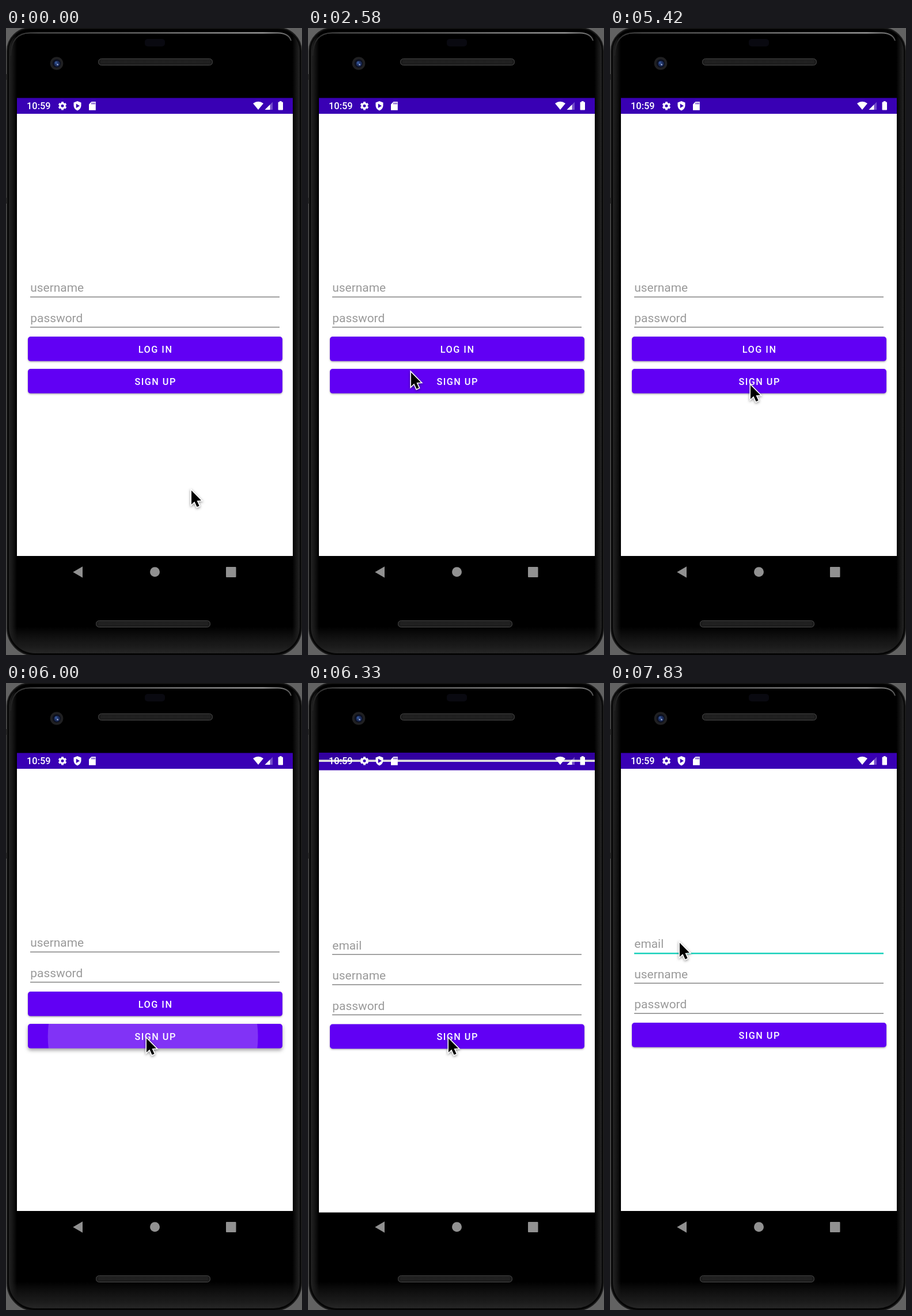
An HTML page with a canvas that plays this animation: 514x1089 px, repeating every 8000 ms.

```html
<!DOCTYPE html>
<html lang="en">
<head>
<meta charset="utf-8">
<title>Sign up flow</title>
<style>
html, body { margin: 0; width: 100%; height: 100%; overflow: hidden; background: #000; }
canvas { display: block; width: 514px; height: 1089px; }
</style>
</head>
<body>
<canvas id="stage"></canvas>
<script>
const W = 514, H = 1089, LOOP = 8000, FPS = 12;
const VIEW = { x: 19, y: 121, w: 479, h: 851 };
const canvas = document.getElementById('stage');
const ctx = canvas.getContext('2d');
const ratio = window.devicePixelRatio || 1;
canvas.width = W * ratio;
canvas.height = H * ratio;

// Pointer tip: time, x, y
const PATH = [
  [0, 321, 801], [670, 203, 586], [1000, 196, 563], [1330, 191, 542],
  [1580, 184, 550], [2330, 182, 594], [2580, 178, 596], [2720, 160, 604],
  [2830, 150, 599], [3000, 156, 592], [3170, 162, 584], [3960, 162, 584],
  [4170, 172, 580], [4420, 172, 580], [5250, 243, 618], [5420, 243, 618],
  [5900, 243, 615], [6750, 243, 615], [7330, 120, 449], [8000, 120, 449]
];
const PRESS = 5830, OPEN = 6048, OPEN_TIME = 425, FOCUS = 7330, BLINK = 500;

const clamp = v => Math.max(0, Math.min(1, v));
const cubic = (a, b, c, d, s) => {
  const r = 1 - s;
  return a * r * r * r + 3 * b * r * r * s + 3 * c * r * s * s + d * s * s * s;
};

// Solves a Bezier easing from (x0,y0) to (x3,y3) for x
function bezier(x0, y0, x1, y1, x2, y2, x3, y3, x) {
  let lo = 0, hi = 1;
  for (let i = 0; i < 24; i++) {
    const mid = (lo + hi) / 2;
    if (cubic(x0, x1, x2, x3, mid) < x) lo = mid; else hi = mid;
  }
  return cubic(y0, y1, y2, y3, lo);
}
const slideEase = x => bezier(0, 0, .4, 0, .2, 1, 1, 1, x);
const revealEase = x => x < 1 / 6
  ? bezier(0, 0, .05, 0, .1333, .06, 1 / 6, .4, x)
  : bezier(1 / 6, .4, .2083, .82, .25, 1, 1, 1, x);

function rect(x, y, w, h, fill) {
  ctx.fillStyle = fill;
  ctx.fillRect(x, y, w, h);
}

function pill(x, y, w, h, r, fill, stroke, width = 1) {
  ctx.beginPath();
  ctx.roundRect(x, y, w, h, r);
  if (fill) { ctx.fillStyle = fill; ctx.fill(); }
  if (stroke) { ctx.strokeStyle = stroke; ctx.lineWidth = width; ctx.stroke(); }
}

function disc(x, y, r, fill) {
  ctx.beginPath();
  ctx.arc(x, y, r, 0, Math.PI * 2);
  ctx.fillStyle = fill;
  ctx.fill();
}

function poly(points, fill) {
  ctx.beginPath();
  points.forEach(([x, y]) => ctx.lineTo(x, y));
  ctx.closePath();
  ctx.fillStyle = fill;
  ctx.fill();
}

function text(str, x, y, font, fill, align = 'left', spacing = 0) {
  ctx.font = font + ' Roboto, sans-serif';
  ctx.letterSpacing = spacing + 'px';
  ctx.textAlign = align;
  ctx.fillStyle = fill;
  ctx.fillText(str, x, y);
  ctx.letterSpacing = '0px';
}

function fade(x0, y0, x1, y1, ...stops) {
  const g = ctx.createLinearGradient(x0, y0, x1, y1);
  stops.forEach(([at, color]) => g.addColorStop(at, color));
  return g;
}

function speaker(x, y) {
  pill(x + .5, y + .5, 198, 11, 5, '#1b1b1b', '#4a4a4a');
  ctx.strokeStyle = '#303030';
  ctx.lineWidth = 1;
  ctx.setLineDash([1, 1]);
  ctx.beginPath();
  for (const dy of [3.5, 5.5, 7.5]) {
    ctx.moveTo(x + 5, y + dy);
    ctx.lineTo(x + 194, y + dy);
  }
  ctx.stroke();
  ctx.setLineDash([]);
}

function device() {
  rect(0, 0, W, H, '#626262');
  rect(0, 80, 5, 10, '#2b2b2b');
  rect(0, 295, 5, 10, '#2b2b2b');
  rect(0, 90, 3, 205, '#484848');
  pill(2, 0, 511, 1090, [40, 40, 48, 48], '#050505', '#1b1b1b', 2);
  pill(5, 3, 505, 1083, [36, 36, 45, 45],
    fade(5, 0, 510, 0, [0, '#222'], [.012, '#161616'], [.028, '#000'],
      [.975, '#000'], [.988, '#141414'], [1, '#242424']));
  ctx.save();
  ctx.beginPath();
  ctx.roundRect(5, 3, 505, 1083, [36, 36, 45, 45]);
  ctx.clip();
  rect(0, 1040, W, 49, fade(0, 1040, 0, 1089, [0, '#22222200'], [.7, '#1b1b1b'], [1, '#292929']));
  ctx.restore();

  ctx.beginPath();
  ctx.moveTo(8, 48);
  ctx.quadraticCurveTo(9, 8.5, 42, 8.5);
  ctx.lineTo(472, 8.5);
  ctx.quadraticCurveTo(491, 9, 495, 22);
  ctx.strokeStyle = fade(8, 0, 495, 0, [0, '#222'], [.1, '#555'], [.45, '#777'], [.9, '#bbb'], [1, '#555']);
  ctx.lineWidth = 2;
  ctx.stroke();

  pill(241, 19, 35, 13, 5, '#090910');
  disc(88, 61.5, 11.3, '#202022');
  disc(88, 61.5, 7.3, '#0c101f');
  disc(88.5, 62, 5, '#1c2d5c');
  disc(87, 60.5, 2.4, '#31508e');
  disc(89.5, 63.5, 1.3, '#aab8dc');
  speaker(160, 53);
  speaker(156, 1029);
}

function gear(x, y) {
  ctx.save();
  ctx.translate(x, y);
  for (let i = 0; i < 3; i++) {
    rect(-1.9, -7.2, 3.8, 14.4, '#fff');
    ctx.rotate(Math.PI / 3);
  }
  ctx.beginPath();
  ctx.arc(0, 0, 4.1, 0, Math.PI * 2);
  ctx.strokeStyle = '#fff';
  ctx.lineWidth = 3.2;
  ctx.stroke();
  disc(0, 0, 2.5, '#3900b4');
  ctx.restore();
}

function statusIcons() {
  text('10:59', 36, 141.3, '500 16.4px', '#fff');
  gear(98, 135.3);

  ctx.beginPath();
  ctx.moveTo(124, 127);
  ctx.lineTo(130.5, 129.5);
  ctx.lineTo(130.5, 134.5);
  ctx.quadraticCurveTo(130.5, 140.5, 124, 143.5);
  ctx.quadraticCurveTo(117.5, 140.5, 117.5, 134.5);
  ctx.lineTo(117.5, 129.5);
  ctx.closePath();
  ctx.fillStyle = '#fff';
  ctx.fill();
  poly([[121.8, 131.5], [128, 135.3], [121.8, 139]], '#3900b4');

  poly([[148.5, 128], [155.8, 128], [155.8, 142.8], [144, 142.8], [144, 132.5]], '#fff');
  for (const x of [148.6, 151, 153.4]) rect(x, 129.5, 1.2, 3, '#3900b4');

  ctx.beginPath();
  ctx.moveTo(438, 142);
  ctx.lineTo(429, 131);
  ctx.quadraticCurveTo(438, 124.5, 447, 131);
  ctx.closePath();
  ctx.fillStyle = '#fff';
  ctx.fill();
  poly([[463, 128.5], [463, 142], [449.5, 142]], 'rgba(255,255,255,.3)');
  poly([[458.5, 133], [458.5, 142], [449.5, 142]], '#fff');
  pill(472.6, 128.6, 8.4, 14, .8, '#fff');
  rect(475, 127, 3.6, 2, '#fff');
}

function navIcons() {
  const gray = 'rgba(255,255,255,.57)';
  poly([[116.3, 945], [133, 935.3], [133, 954.7]], gray);
  disc(258.5, 944.8, 8.5, gray);
  pill(382, 936, 17.5, 18, 1, gray);
}

function field(hint, line, focused, caret) {
  text(hint, 42.3, line - 8.6, '20.9px', '#9a9a9a');
  if (focused) rect(42, line - .3, 433, 2.6, '#20d2bd');
  else rect(42, line - .5, 433, 1.4, '#7b7b7b');
  if (caret) rect(42, line - 27, 2, 25, '#20d2bd');
}

function button(label, y, press = 0) {
  ctx.save();
  ctx.shadowColor = `rgba(0,0,0,${.32 + .06 * press})`;
  ctx.shadowBlur = (3 + 5 * press) * ratio;
  ctx.shadowOffsetY = (1.4 + 2.5 * press) * ratio;
  pill(38, y, 442, 42.6, 4.7, '#6100f4');
  ctx.restore();
  if (press > 0) {
    ctx.save();
    ctx.beginPath();
    ctx.roundRect(38, y, 442, 42.6, 4.7);
    ctx.clip();
    disc(243 + 16 * press, y + 22, 20 + 215 * press, 'rgba(255,255,255,.2)');
    ctx.restore();
  }
  text(label, 259.6, y + 27.8, '500 16.3px', '#fff', 'center', 1.46);
}

function page() {
  rect(VIEW.x, VIEW.y, VIEW.w, VIEW.h, '#000');
  rect(VIEW.x, 121.5, VIEW.w, 28, '#3900b4');
  rect(VIEW.x, 149, VIEW.w, 768, '#fff');
}

function loginPage(press) {
  page();
  field('username', 467);
  field('password', 519.4);
  button('LOG IN', 536);
  button('SIGN UP', 592, press);
}

function signupPage(t) {
  page();
  const since = t - FOCUS;
  field('email', 468.7, since >= 0, since >= 0 && since % (2 * BLINK) < BLINK - 5);
  field('username', 521.2);
  field('password', 573.6);
  button('SIGN UP', 590);
}

function view(t) {
  ctx.save();
  ctx.beginPath();
  ctx.rect(VIEW.x, VIEW.y, VIEW.w, VIEW.h);
  ctx.clip();
  const p = clamp((t - OPEN) / OPEN_TIME);
  const slide = p === 1 ? 1 : slideEase(p), reveal = p === 1 ? 1 : revealEase(p);
  if (p < 1) {
    ctx.save();
    ctx.translate(0, -.02 * VIEW.h * slide);
    loginPage(clamp((t - PRESS) / 225));
    rect(VIEW.x, VIEW.y, VIEW.w, VIEW.h, `rgba(0,4,8,${.125 * clamp(reveal * 1.2)})`);
    ctx.restore();
  }
  if (p > 0) {
    ctx.translate(0, .0395 * VIEW.h * (1 - slide));
    ctx.beginPath();
    ctx.rect(VIEW.x, VIEW.y + .959 * VIEW.h * (1 - reveal), VIEW.w, VIEW.h);
    ctx.clip();
    signupPage(t);
  }
  ctx.restore();
  statusIcons();
  navIcons();
}

function pointerAt(t) {
  const i = Math.max(1, PATH.findIndex(k => k[0] > t));
  const [t0, x0, y0] = PATH[i - 1], [t1, x1, y1] = PATH[i];
  const u = clamp((t - t0) / (t1 - t0));
  const e = u * u * (3 - 2 * u);
  return [x0 + (x1 - x0) * e, y0 + (y1 - y0) * e];
}

function pointer(x, y) {
  ctx.save();
  ctx.translate(x + 1, y + 2.2);
  ctx.beginPath();
  [[0, 0], [0, 24.3], [5.4, 19.2], [9.6, 28.6], [13.6, 26.8], [9.5, 17.7], [17, 17.3]]
    .forEach(([px, py]) => ctx.lineTo(px, py));
  ctx.closePath();
  ctx.lineJoin = 'miter';
  ctx.lineWidth = 3.2;
  ctx.strokeStyle = '#fff';
  ctx.shadowColor = 'rgba(0,0,0,.45)';
  ctx.shadowBlur = 4 * ratio;
  ctx.shadowOffsetY = 1.5 * ratio;
  ctx.stroke();
  ctx.shadowColor = 'transparent';
  ctx.fillStyle = '#000';
  ctx.fill();
  ctx.restore();
}

function draw(ms) {
  const t = Math.floor((ms % LOOP + 4) * FPS / 1000) * 1000 / FPS % LOOP;
  ctx.setTransform(ratio, 0, 0, ratio, 0, 0);
  device();
  view(t);
  pointer(...pointerAt(t));
}

const start = performance.now();
function tick() {
  draw(performance.now() - start);
  requestAnimationFrame(tick);
}
tick();
</script>
</body>
</html>
```
